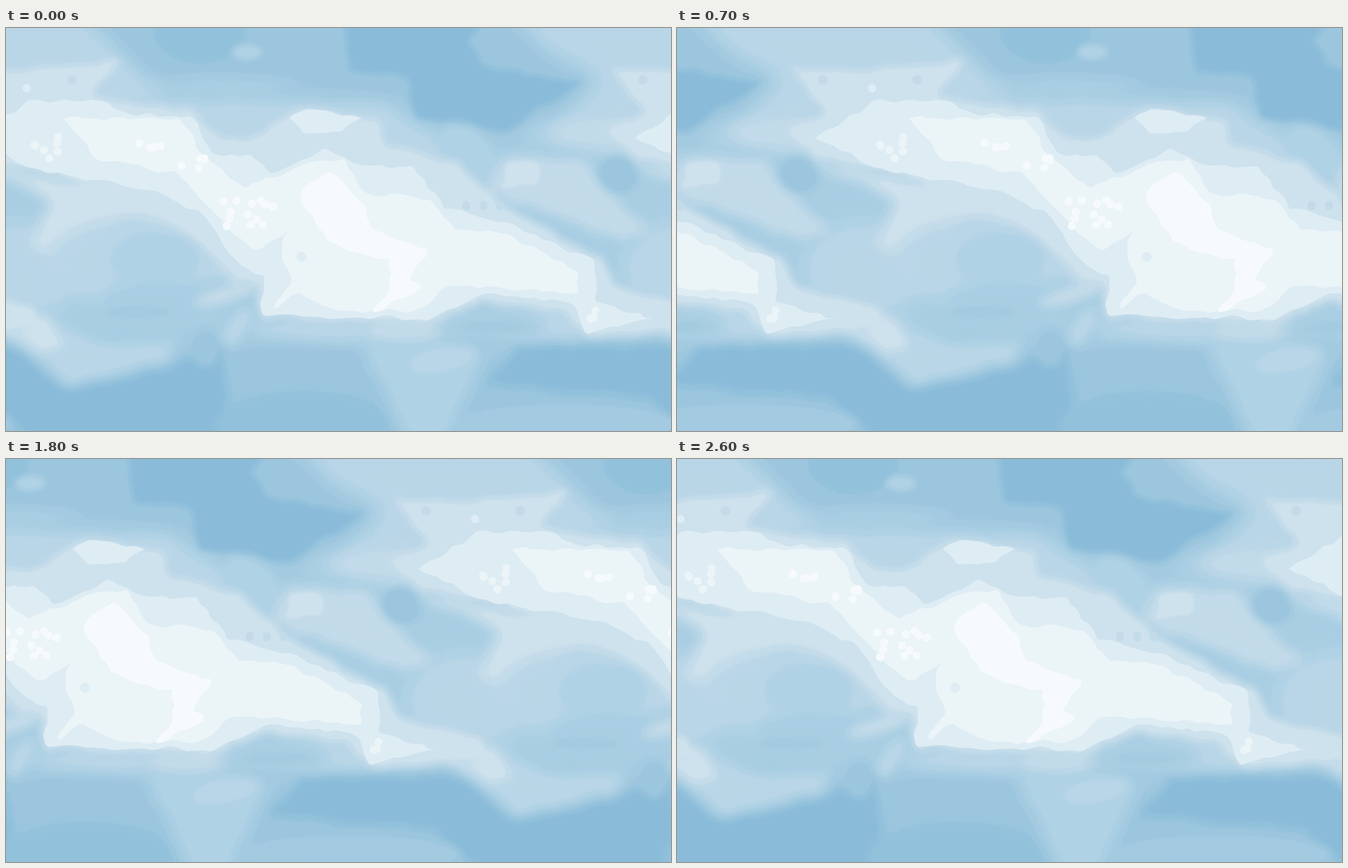
Write an HTML page with a canvas that moves like this. It is 961 px wide and 583 px high and loops after 2700 ms.

```html
<!DOCTYPE html>
<html lang="en">
<head>
<meta charset="utf-8">
<title>Drifting clouds</title>
<style>
html, body { margin: 0; width: 100%; height: 100%; overflow: hidden; background: #9cc6de; }
canvas { display: block; }
</style>
</head>
<body>
<canvas id="stage" width="961" height="583"></canvas>
<script>
const W = 961, H = 583, STEP = 100, SHIFT = 36, LOOP = 2700;
const stage = document.getElementById('stage').getContext('2d');
const tile = Object.assign(document.createElement('canvas'), { width: W, height: H });
const ctx = tile.getContext('2d', { willReadFrequently: true });

// Sky tones from deep blue to white
const tones = ['8abcd9', '92c1db', '9cc6de', 'a3cae0', 'a9cee3', 'b0d2e5', 'b9d6e7',
  'c3dbe9', 'cee2ed', 'deecf4', 'ebf4f7', 'f6fafd'];
const rgb = tones.map(t => [0, 2, 4].map(i => parseInt(t.slice(i, i + 2), 16)));

let seed = 7;
const random = () => (seed = seed * 16807 % 2147483647) / 2147483647;
const spread = size => (random() * 2 - 1) * size;

// Fills a path on the tile so that it wraps from side to side
function paint(tone, blur, path) {
  ctx.filter = blur ? `blur(${blur}px)` : 'none';
  ctx.fillStyle = '#' + tones[tone];
  for (const dx of [-W, 0, W]) {
    ctx.setTransform(1, 0, 0, 1, dx, 0);
    ctx.fill(path);
  }
  ctx.setTransform(1, 0, 0, 1, 0, 0);
}

// Cloud outline through a few corners, with small random lumps between them
function cloud(tone, blur, corners) {
  const p = corners.split(' ').map(s => s.split(',').map(Number));
  const edge = [];
  p.forEach(([x, y], i) => {
    const [nx, ny] = p[(i + 1) % p.length];
    const n = Math.ceil(Math.hypot(nx - x, ny - y) / 14);
    for (let k = 0; k < n; k++) {
      edge.push([x + (nx - x) * k / n + spread(4), y + (ny - y) * k / n + spread(4)]);
    }
  });
  const path = new Path2D();
  edge.forEach(([x, y], i) => {
    const [nx, ny] = edge[(i + 1) % edge.length];
    path.quadraticCurveTo(x, y, (x + nx) / 2, (y + ny) / 2);
  });
  paint(tone, blur, path);
}

function puff(tone, blur, x, y, rx, ry, tilt = 0) {
  const path = new Path2D();
  path.ellipse(x, y, rx, ry, tilt, 0, 7);
  paint(tone, blur, path);
}

function flecks(tone, count, x, y, dx, dy) {
  while (count--) puff(tone, 0, x + spread(dx), y + spread(dy), 6, 6);
}

function paintSky() {
  ctx.fillStyle = '#' + tones[2];
  ctx.fillRect(0, 0, W, H);

  // Open sky
  cloud(4, 18, '-20,110 300,85 560,105 700,165 980,110 980,445 560,475 -20,450');
  cloud(0, 4, '485,-20 700,-20 665,20 690,55 835,78 720,150 590,130 580,72 500,62');
  puff(1, 5, 280, 5, 65, 45);
  puff(4, 9, 310, 85, 110, 14);
  puff(5, 4, 348, 35, 22, 11);
  cloud(0, 7, '690,515 740,460 980,458 1040,520 1210,487 1270,455 1290,600 1000,600 930,535');
  puff(1, 8, 430, 575, 130, 48);
  puff(3, 6, 810, 572, 160, 28);

  // High haze
  cloud(6, 14, '-240,-20 -165,40 -105,75 -150,125 -225,155 -100,180 0,205 230,100 180,50 110,-20');
  cloud(6, 10, '190,105 540,108 680,200 690,235 600,220 290,180');
  puff(5, 8, 670, 180, 50, 30, 0.8);
  puff(7, 10, 890, 152, 105, 22);
  cloud(7, 8, '715,187 835,189 870,240 935,292 890,308 690,235');
  cloud(8, 3, '728,192 770,192 770,225 715,230');
  puff(2, 4, 885, 212, 30, 26, 0.5);
  puff(4, 8, 912, 338, 30, 25);

  // Shaded hollow on the left
  puff(6, 14, 20, 350, 90, 70);
  cloud(8, 9, '-60,195 60,215 220,225 375,355 345,380 250,315 180,280 80,325 100,360 35,310 65,250 20,225');
  puff(6, 12, 185, 340, 125, 62);
  puff(5, 8, 215, 335, 65, 40);
  puff(4, 9, 225, 395, 90, 30);
  puff(3, 4, 190, 411, 50, 8);
  puff(7, 7, 318, 385, 48, 12, -0.3);
  puff(2, 6, 288, 463, 22, 28);
  cloud(6, 9, '-20,410 70,420 130,455 250,455 235,482 90,518 50,480 -10,445');
  cloud(8, 7, '-40,395 20,400 65,425 85,462 55,470 0,435');

  // Wisps under the main cloud
  puff(2, 9, 440, 485, 120, 30);
  puff(6, 7, 335, 432, 32, 13, -1);
  puff(6, 10, 500, 435, 145, 18);
  cloud(5, 11, '510,450 600,440 695,470 635,600 580,600');
  puff(7, 7, 575, 438, 55, 14);
  puff(6, 7, 630, 480, 50, 17, -0.2);
  puff(6, 8, 810, 428, 190, 20);
  puff(3, 10, 705, 432, 75, 17);

  // Main cloud, from its halo to the bright core
  cloud(8, 6, '-90,55 0,62 165,45 120,98 270,122 310,160 350,160 430,113 545,135 545,168 650,195 740,270 860,332 885,375 1000,405 1000,435 840,445 800,410 690,396 610,428 365,418 365,372 200,255 60,212 -45,190 -95,150 -40,125');
  cloud(9, 0, '412,132 425,118 515,128 485,150 430,151');
  cloud(9, 0, '-50,157 32,106 140,104 165,121 270,130 300,183 350,185 385,210 465,177 515,200 590,200 632,260 725,282 852,337 853,397 938,420 840,440 815,396 685,385 610,420 370,416 372,355 340,348 285,272 210,232 45,207');
  cloud(10, 0, '85,130 250,133 292,190 345,232 450,190 490,190 518,238 615,247 650,291 725,298 828,352 828,384 640,373 595,408 490,412 420,385 385,407 410,365 396,315 410,292 360,325 265,235 245,210 130,190');
  cloud(11, 0, '422,240 465,207 517,255 528,291 612,320 583,362 600,380 530,410 556,377 553,335 465,310');

  // Flecks
  flecks(10, 7, 65, 165, 25, 24);
  flecks(10, 3, 850, 418, 10, 10);
  flecks(11, 4, 215, 170, 30, 4);
  flecks(11, 5, 270, 193, 18, 10);
  flecks(11, 13, 350, 270, 38, 22);
  puff(9, 0, 427, 331, 7, 7);
  puff(9, 0, 30, 87, 6, 6);
  for (const x of [665, 690, 714]) puff(7, 0, x, 257, 6, 7);
  for (const x of [95, 920]) puff(7, 0, x, 75, 7, 7);
}

// Pulls each pixel half-way to the nearest tone, for flat bands with a soft glow
function band() {
  const image = ctx.getImageData(0, 0, W, H), d = image.data;
  const nearest = Array.from({ length: 256 }, (_, v) =>
    rgb.reduce((a, b) => Math.abs(b[0] - v) < Math.abs(a[0] - v) ? b : a));
  for (let i = 0; i < d.length; i += 4) {
    const tone = nearest[d[i]];
    for (let n = 0; n < 3; n++) d[i + n] = (d[i + n] + tone[n]) / 2;
  }
  ctx.putImageData(image, 0, 0);
}

function frame() {
  const x = Math.floor(performance.now() % LOOP / STEP) * SHIFT;
  stage.drawImage(tile, x, 0);
  stage.drawImage(tile, x - W, 0);
  requestAnimationFrame(frame);
}

paintSky();
band();
frame();
</script>
</body>
</html>
```
